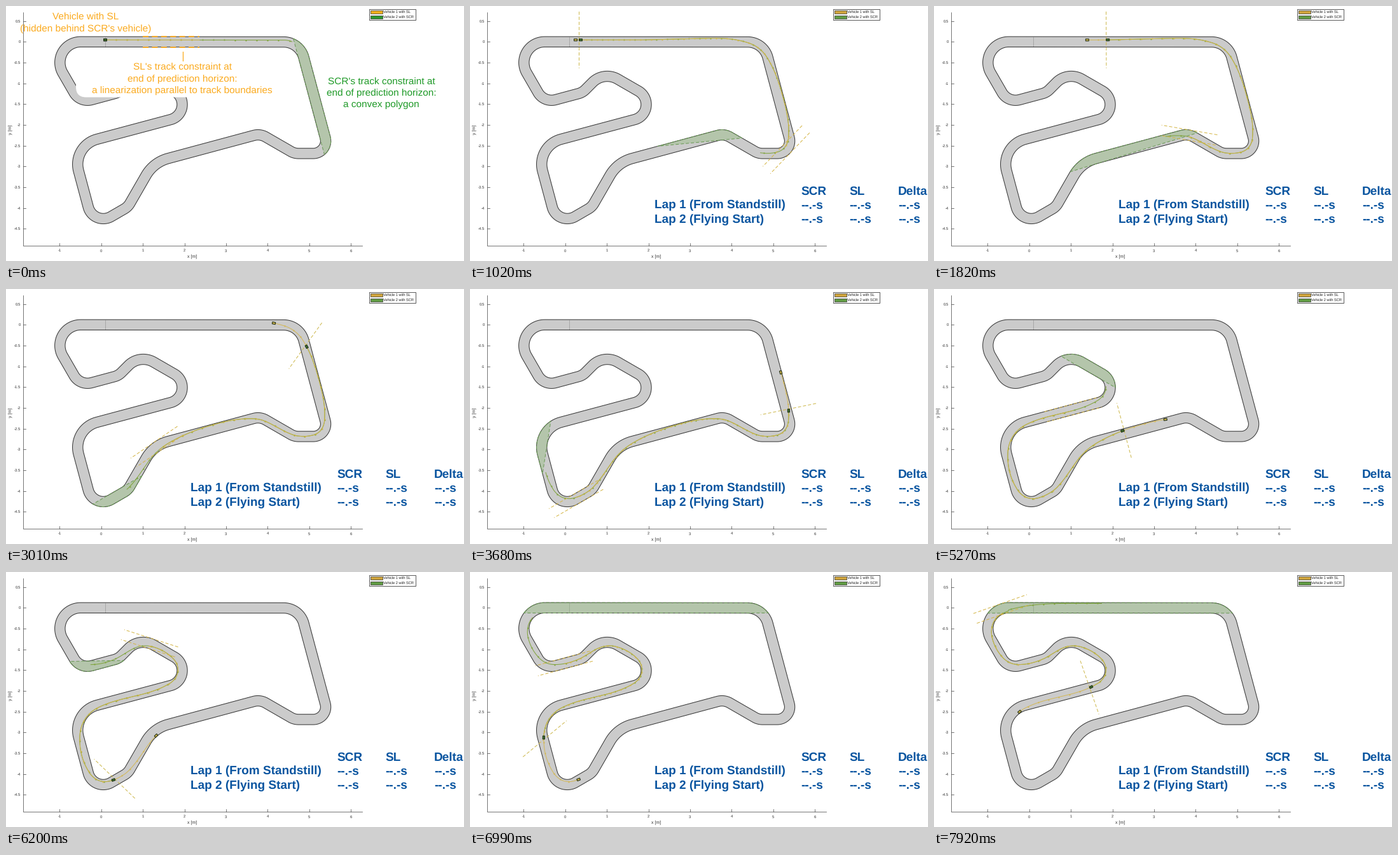
Animation of 720 by 401 pixels, one loop 8000 ms. Source, as a matplotlib script:

```python
import numpy as np
import matplotlib.pyplot as plt
from matplotlib.animation import FuncAnimation
from matplotlib.patches import FancyBboxPatch, Polygon, Rectangle

plt.rcParams["text.hinting"] = "none"

WIDTH, HEIGHT, DPI = 720, 401, 100
PX = 72 / DPI                      # points per pixel
INTERVAL, FRAMES = 40, 200
INTRO, STEP = 500, 130.2           # ms: opening hold, simulation step
UNIT = 65.35                       # pixels per metre
X0, Y0 = 149.8, 56.3               # pixel of the plot's origin
HALF = UNIT / 8                    # half track width
START = 38.5                       # start line, pixels along the track
PREVIEW = 500                      # planned distance of the lead car

ORANGE, GREEN, BLUE = "#fbab20", "#1f9a28", "#0a55a0"
YELLOW, OLIVE, LEAF = "#d4b544", "#cdb84c", "#7fa33a"

# straight length [m], corner radius [m], turn [15 degrees, left positive]
COURSE = [
    (4.88, .5, -5), (2, .3, -7), (.352, .375, -2), (.697, .375, 3),
    (2.137, .875, 3), (.772, .375, -2), (.365, .375, -7), (.9, .625, -6),
    (1.834, .375, 9), (.577, .5, 5), (.243, .375, -2), (.569, .375, -5),
    (.544, .5, -8),
]

# ms, then pixels along the track: lead car, rear car, rear plan's end, zone
KEYS = np.array([
    (370, START, START, 142, 434),
    (1020, 56.5, 48.5, 513, 625.5),
    (1820, 158.5, 125.5, 622, 774),
    (3010, 379, 309.5, 795, 888),
    (4340, 588, 537, 1023, 1190),
    (6200, 892, 792.5, 1289, 1396),
    (7920, 1178, 1057, 1520, 1848.5),
])


def left_of(heading):
    return np.stack([-np.sin(heading), -np.cos(heading)], -1)


def build_track():
    """Drive along straights and arcs in steps of about one pixel."""
    steps, bends, signs = [], [], []
    for length, radius, turn in COURSE:
        angle = np.radians(15 * turn)
        for dist, bend in ((length * UNIT, 0), (radius * UNIT * abs(angle), angle)):
            n = round(dist)
            steps += [dist / n] * n
            bends += [bend / n] * n
            signs += [np.sign(bend)] * n
    bends = np.array(bends)
    head = np.cumsum(bends) - bends
    mean = head + bends / 2
    move = np.array(steps)[:, None] * np.stack([np.cos(mean), -np.sin(mean)], 1)
    move -= move.mean(0)           # close the loop exactly
    return np.cumsum(move, 0) - move + [117.5, Y0], head, np.array(signs)


MID, HEAD, TURN = build_track()
SIDE = left_of(HEAD)
LAP = len(MID)
EDGE = {k: MID + k * HALF * SIDE for k in (-1, 1)}


def racing_offset(limit=7.0, skip=6, rounds=4000):
    """Offsets of the least curved lap (accelerated projected gradient)."""
    p, side = MID[::skip], SIDE[::skip]
    eye = np.eye(len(p))
    d = np.roll(eye, 1, 0) + np.roll(eye, -1, 0) - 2 * eye
    k = d.T @ d
    q = k * (side @ side.T)
    c = ((k @ p) * side).sum(1)
    w = look = np.zeros(len(p))
    for i in range(rounds):
        new = np.clip(look - (q @ look + c) / 16, -limit, limit)
        look = new + i / (i + 3) * (new - w)
        w = new
    return np.interp(np.arange(LAP), np.arange(0, LAP, skip), w, period=LAP)


OFFSET = racing_offset()


def at(curve, s):
    """Value of a closed curve at a fractional distance."""
    i = np.floor(s).astype(int)
    u = s - i
    if curve.ndim > 1:
        u = u[..., None]
    return curve[i % LAP] * (1 - u) + curve[(i + 1) % LAP] * u


def racer(s):
    """Standing start left of the middle, blending into the racing line."""
    s = np.asarray(s, float)
    lane = 3 + (at(OFFSET, s) - 3) * np.clip((s - 150) / 150, 0, 1)
    return at(MID, s) + lane[..., None] * at(SIDE, s)


def glide(column, now):
    """Monotone cubic through one column of the keys."""
    t, v = KEYS[:, 0], KEYS[:, column]
    d = np.diff(v) / np.diff(t)
    m = np.r_[0, 2 * d[:-1] * d[1:] / (d[:-1] + d[1:]), d[-1]]
    i = np.clip(np.searchsorted(t, now, "right") - 1, 0, len(t) - 2)
    h = t[i + 1] - t[i]
    u = min((now - t[i]) / h, 1)
    return (v[i] + h * m[i] * u * (1 - u) ** 2 + h * m[i + 1] * u * u * (u - 1)
            + (v[i + 1] - v[i]) * u * u * (3 - 2 * u))


def convex_zone(i):
    """Convex area between the outer edge and a tangent of the inner edge."""
    near = sorted(range(-200, 201), key=abs)
    k = next(TURN[(i + o) % LAP] for o in near if TURN[(i + o) % LAP])
    apex, out, rim = EDGE[k][i], -k * SIDE[i], EDGE[-k]

    def walk(step):
        j, path = i, []
        while (rim[(j + step) % LAP] - apex) @ out > 0 and TURN[(j + step) % LAP] != -k:
            j += step
            path.append(rim[j % LAP])
        q = rim[j % LAP]
        way = q - rim[(j - step) % LAP]
        way = way / np.hypot(*way)
        drop = max(-(way @ out), 1e-6)
        path.append(q + way * min((q - apex) @ out / drop, 60))
        return path

    return np.array(walk(-1)[::-1] + [rim[i]] + walk(1) + [apex])


def unit(v):
    return v / np.hypot(*v)


def across(v):
    return np.array([-v[1], v[0]])


def bar(centre, way, half=44.5):
    return np.array([centre - half * way, centre + half * way]).T


fig = plt.figure(figsize=(WIDTH / DPI, HEIGHT / DPI), dpi=DPI, facecolor="white")
ax = fig.add_axes([0, 0, 1, 1])
ax.set(xlim=(0, WIDTH), ylim=(HEIGHT, 0))
ax.axis("off")


def write(x, y, s, size, color="#333333", ha="left", **kw):
    return ax.text(x, y, s, fontsize=size * PX, color=color, ha=ha,
                   family="Liberation Sans", **kw)


def stroke(color, width, z, x=(), y=(), **kw):
    return ax.plot(x, y, color=color, lw=width * PX, zorder=z, **kw)[0]


def shape(z, fc="none", ec="none", width=1, xy=((0, 0),), **kw):
    return ax.add_patch(Polygon(xy, fc=fc, ec=ec, lw=width * PX, zorder=z, **kw))


# axes
stroke("#555555", 0.8, 1, [26.5, 26.5, 560], [10, 377, 377])
for k in range(-9, 2):
    y = Y0 - k * UNIT / 2
    stroke("#555555", 0.8, 1, [26.5, 31], [y, y])
    write(23.5, y + 2, f"{k / 2:g}", 6, ha="right")
for k in range(-1, 7):
    x = X0 + k * UNIT
    stroke("#555555", 0.8, 1, [x, x], [372.5, 377])
    write(x, 386.5, str(k), 6, ha="center")
write(293, 396, "x [m]", 7, ha="center")
write(7, 194, "y [m]", 7, ha="center", va="center", rotation=90)

# track
shape(2, fc="#cbcbcb", xy=EDGE[1])
shape(2.1, fc="white", xy=EDGE[-1])
for e in EDGE.values():
    shape(3, ec="#333333", xy=e)
stroke("#555555", 0.8, 3, [155.5, 155.5], [48, 65], ls=":")

# legend
ax.add_patch(Rectangle((570.5, 4.5), 73, 17, fc="white", ec="#333333", lw=0.8 * PX))
swatches = []
for y, s in ((6.5, "Vehicle 1 with SL"), (14.5, "Vehicle 2 with SCR")):
    swatches.append(ax.add_patch(Rectangle((572.5, y), 19, 5, ec="#333333", lw=0.7 * PX)))
    write(593, y + 4.8, s, 5.6, "#222222")

# moving parts
DASH = (0, (5, 3))
zone = shape(4, fc=(0.55, 0.74, 0.45, 0.36))
rim = shape(4, ec="#6a9a55", ls=DASH)
dots = dict(marker="s", ms=1.4, markevery=17, mec="none")
plan_lead = stroke(LEAF, 1, 5, **dots)
plan_trail = stroke(YELLOW, 1, 5.1, alpha=0.85, **dots)
walls = [stroke(YELLOW, 1, 6, ls=DASH) for _ in range(2)]
gap = stroke(OLIVE, 1, 6, ls=DASH)
car_trail, car_lead = (shape(8, fc=c, ec="#1c2a14") for c in ("#c9b04a", "#3f7030"))

# opening notes
notes = [ax.add_patch(FancyBboxPatch((126, 104), 298, 23.5, fc="white", ec="none", zorder=7,
                                     boxstyle="round,pad=16,rounding_size=16"))]
notes.append(stroke(ORANGE, 1.3, 9, [277.5, 277.5], [72, 86]))
for x, y, color, text in (
        (125, 22, ORANGE, "Vehicle with SL\n(hidden behind SCR's vehicle)"),
        (277, 101, ORANGE, "SL's track constraint at\nend of prediction horizon:\n"
                           "a linearization parallel to track boundaries"),
        (590, 123.5, GREEN, "SCR's track constraint at\nend of prediction horizon:\n"
                            "a convex polygon")):
    for k, s in enumerate(text.split("\n")):
        notes.append(write(x, y + 17.7 * k, s, 15.4, color, "center", zorder=9))

# lap table
table = []
for row, name in enumerate(("", "Lap 1 (From Standstill)", "Lap 2 (Flying Start)")):
    y = 296.5 + 22 * row
    cells = [name] + (["--.-s"] * 3 if row else ["SCR", "SL", "Delta"])
    for x, s in zip((290.5, 520.5, 596.5, 673), cells):
        table.append(write(x, y, s, 19, BLUE, weight="bold"))


def place_car(car, s):
    p = racer(s)
    way = unit(racer(s + 3) - racer(s - 3))
    side = across(way)
    car.set_xy([p + a * way + b * side
                for a, b in ((-2.5, -1.6), (2.5, -1.6), (2.5, 1.6), (-2.5, 1.6))])
    return p, way


def draw(frame):
    t = frame * INTERVAL + 30
    intro = t < INTRO
    now = KEYS[0, 0] if intro else INTRO + STEP * ((t - INTRO) // STEP)

    for a in notes:
        a.set_visible(intro)
    for a in table + [gap]:
        a.set_visible(not intro)
    for swatch, c in zip(swatches, ("#f0ae1c", "#2c962c") if intro else ("#cfa43c", "#5f9a42")):
        swatch.set_facecolor(c)

    lead, trail, goal, touch = (glide(c, now) for c in (1, 2, 3, 4))
    p1, _ = place_car(car_trail, trail)
    p2, way = place_car(car_lead, lead)
    ends = (START + 149, START + 294) if intro else (goal, lead + PREVIEW)
    for plan, a, b in ((plan_trail, trail, ends[0]), (plan_lead, lead, ends[1])):
        path = np.arange(a, b)
        xy = at(MID, path) + 3 * at(SIDE, path) if intro else racer(path)
        plan.set_data(*xy.T)

    # separating line across the link between both cars
    link = unit(p2 - p1 + 1e-3 * way)
    gap.set_data(*bar(p2 - 2.5 * link, across(link)))

    side = unit(at(SIDE, goal))
    for wall, k in zip(walls, (-1, 1)):
        wall.set_data(*bar(at(MID, goal) + k * HALF * side, across(side)))
        wall.set_color(ORANGE if intro else YELLOW)
        wall.set_linewidth((1.8 if intro else 1) * PX)

    area = convex_zone(int(round(touch)) % LAP)
    zone.set_xy(area)
    rim.set_xy(area)
    return []


anim = FuncAnimation(fig, draw, frames=FRAMES, interval=INTERVAL, repeat=True,
                     repeat_delay=0, init_func=lambda: draw(0))
plt.show()
```
